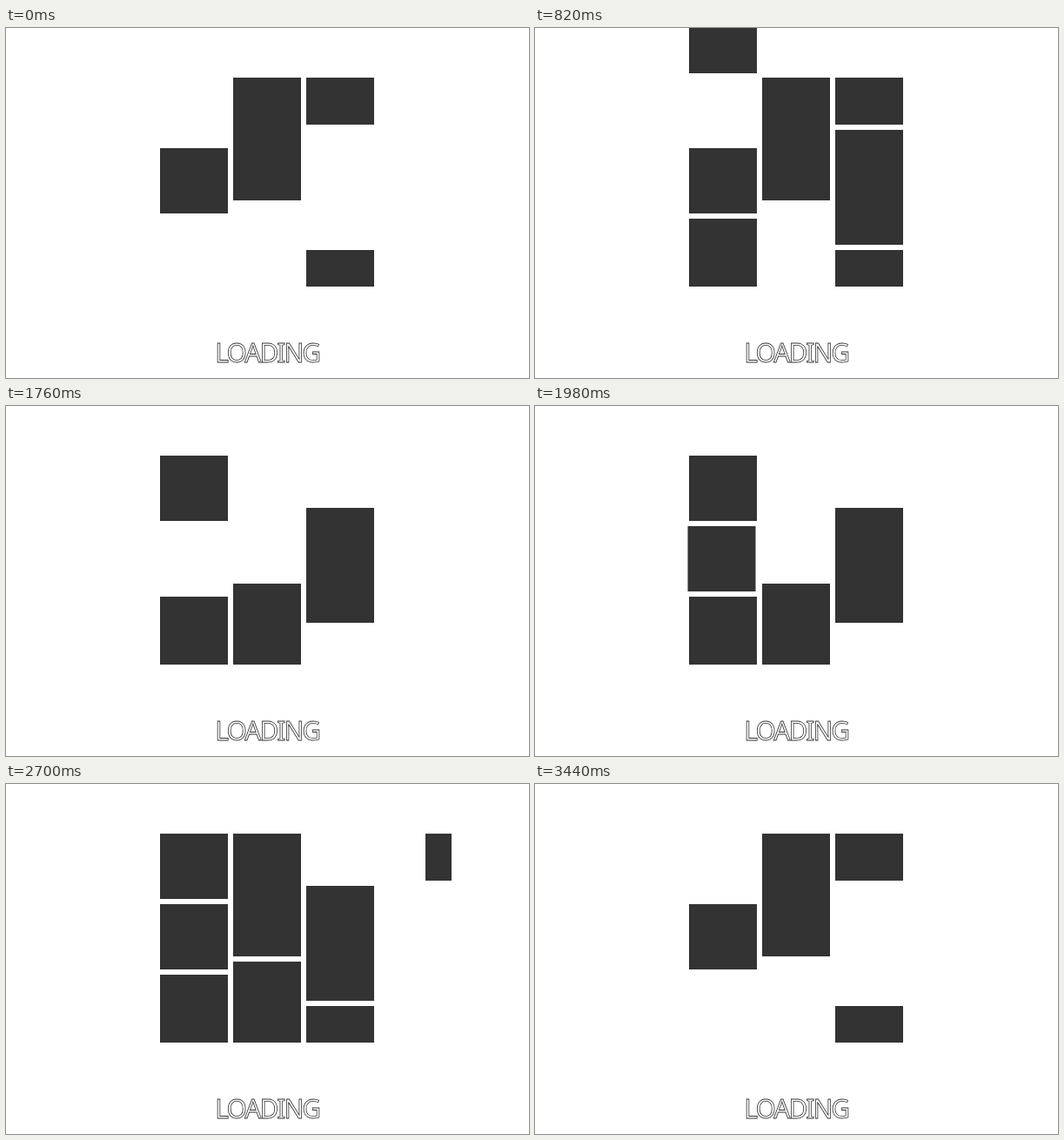
An HTML page that plays this animation: 601x402 px, repeating every 3460 ms.

```html
<!DOCTYPE html>
<html lang="en">
<head>
<meta charset="utf-8">
<title>Loading</title>
<style>
  html, body { margin: 0; width: 100%; height: 100%; overflow: hidden; background: #fff; }
  svg { display: block; }
  rect { fill: #333; }
  text {
    font: 30px "Noto Sans", sans-serif;
    letter-spacing: -2px;
    text-anchor: middle;
    fill: #fff;
    stroke: #333;
    stroke-width: .8;
  }
</style>
</head>
<body>
<svg width="601" height="402">
  <clipPath id="view"><path d="M88 0H512V402H88Z"/></clipPath>
  <g id="blocks" clip-path="url(#view)"></g>
  <text x="300.2" y="383.5">LOADING</text>
</svg>
<script>
const LOOP = 3460, STEP = 20, WIDTH = 78;
const FIRST_EXIT = 3440, SECOND_EXIT = 1760;

// Each block slides in from (dx, dy) and vanishes at its exit time.
const blocks = [
  { x: 177, y: 219, h: 78,  dx: -121, enter: 180,  time: 270, exit: FIRST_EXIT },
  { x: 345, y: 117, h: 132, dx: 121,  enter: 460,  time: 270, exit: FIRST_EXIT },
  { x: 177, y: 57,  h: 75,  dy: -80,  enter: 820,  time: 260, exit: FIRST_EXIT },
  { x: 261, y: 204, h: 93,  dy: 87,   enter: 1060, time: 200, exit: FIRST_EXIT },
  { x: 177, y: 138, h: 75,  dx: -121, enter: 1800, time: 270, exit: SECOND_EXIT },
  { x: 261, y: 57,  h: 141, dy: -121, enter: 2080, time: 270, exit: SECOND_EXIT },
  { x: 345, y: 255, h: 42,  dy: 80,   enter: 2440, time: 260, exit: SECOND_EXIT },
  { x: 345, y: 57,  h: 54,  dx: 137,  enter: 2700, time: 180, exit: SECOND_EXIT }
];

const group = document.getElementById("blocks");
for (const block of blocks) {
  block.rect = document.createElementNS("http://www.w3.org/2000/svg", "rect");
  block.rect.setAttribute("width", WIDTH);
  block.rect.setAttribute("height", block.h);
  group.append(block.rect);
}

function place({ rect, x, y, dx = 0, dy = 0, enter, time, exit }, now) {
  const sinceEnter = (now - enter + LOOP) % LOOP;
  const sinceExit = (now - exit + LOOP) % LOOP;
  const left = Math.max(0, 1 - sinceEnter / time) ** 4;
  rect.setAttribute("visibility", sinceExit < sinceEnter ? "hidden" : "visible");
  rect.setAttribute("x", x + dx * left);
  rect.setAttribute("y", y + dy * left);
}

const start = performance.now();

function draw() {
  const elapsed = (performance.now() - start) % LOOP;
  const now = Math.floor(elapsed / STEP) * STEP;
  blocks.forEach(block => place(block, now));
  requestAnimationFrame(draw);
}

draw();
</script>
</body>
</html>
```
